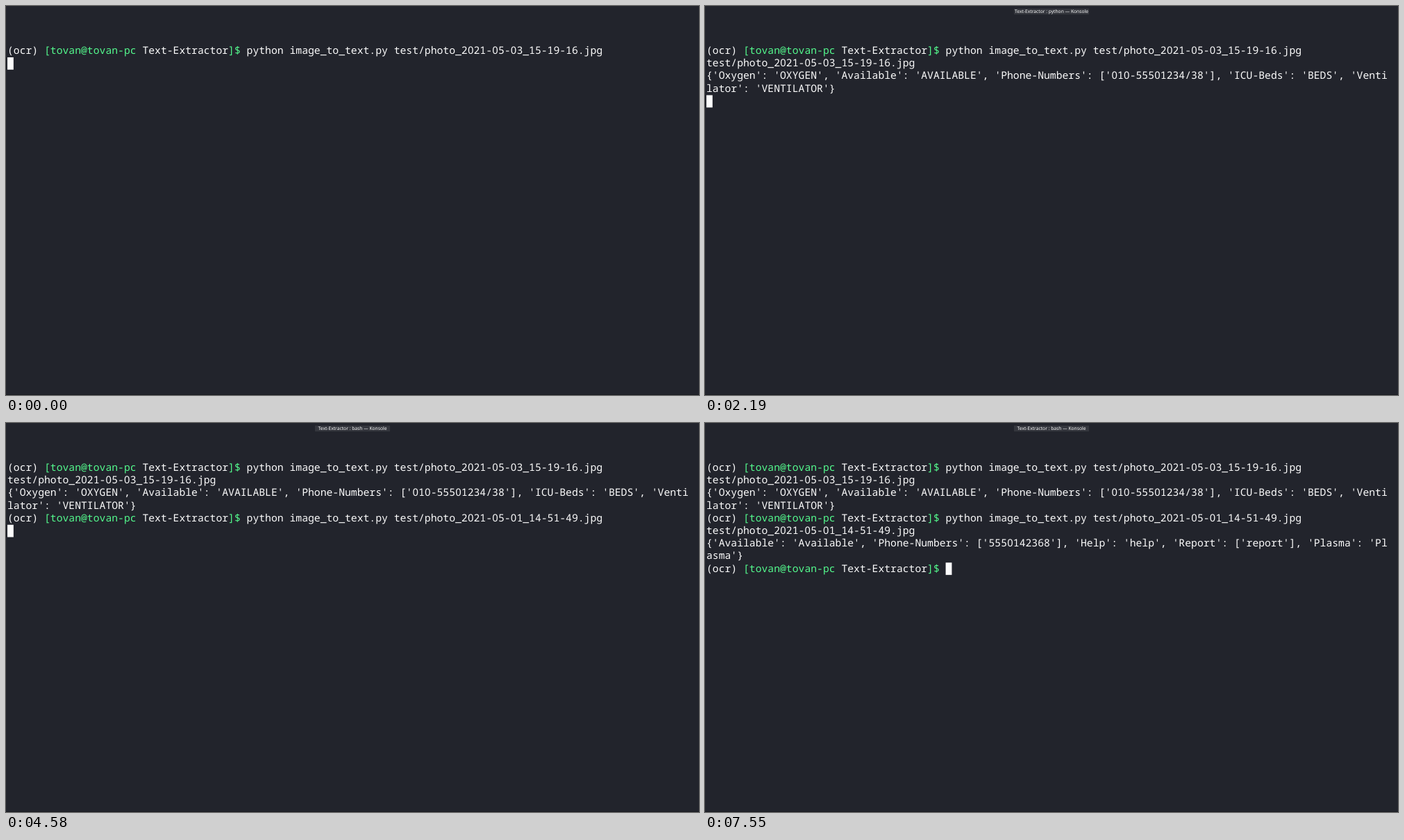
Recreate the animation shown at these times as an HTML page. Size 998 px wide and 561 px high, loop 8 s.

```html
<!DOCTYPE html>
<html lang="en">
<head>
<meta charset="utf-8">
<title>Terminal</title>
<style>
  html, body { margin: 0; width: 100%; height: 100%; overflow: hidden; background: #22242c; }
  svg { display: block; width: 998px; height: 561px; }
  text { white-space: pre; text-rendering: geometricPrecision; fill: #fcfcfc; }
  .row { font: 14.73px "Noto Sans Mono", "DejaVu Sans Mono", monospace; }
  .green { fill: #54f98d; }
  .zero { font-family: "Noto Sans", sans-serif; }
  #title { font: 6.68px "Noto Sans", sans-serif; text-anchor: middle; }
</style>
</head>
<body>
<svg viewBox="0 0 998 561">
  <rect width="998" height="561" fill="#22242c"/>
  <rect y="560" width="998" height="1" fill="#191b21"/>
  <g id="bar">
    <rect x="445" y="3.7" width="108" height="8.5" fill="#35373e"/>
    <text id="title" x="499" y="10"></text>
  </g>
  <g id="rows"></g>
  <rect id="cursor" width="8.84" height="17.8" fill="#fcfcfc"/>
</svg>
<script>
const NS = "http://www.w3.org/2000/svg";
const LOOP = 8000;
const LEFT = 2, TOP = 55.7, CELL = 8.836, LINE = 18.19, BASE = 13.4;
const $ = id => document.getElementById(id);

const USER = "tovan";
const PROMPT = [["(ocr) "], [`[${USER}@${USER}-pc`, "green"], [" Text-Extractor"], ["]$", "green"], [" "]];
const PROMPT_LEN = PROMPT.reduce((n, [s]) => n + s.length, 0);
const fileA = "test/photo_2021-05-03_15-19-16.jpg";
const fileB = "test/photo_2021-05-01_14-51-49.jpg";
const command = file => [...PROMPT, ["python image_to_text.py " + file]];
const END = command(fileA).reduce((n, [s]) => n + s.length, 0);

// Each line: row, start, end, coloured runs
const lines = [
  [0, 0, LOOP, command(fileA)],
  [1, 300, LOOP, [[fileA]]],
  [2, 2190, LOOP, [["{'Oxygen': 'OXYGEN', 'Available': 'AVAILABLE', 'Phone-Numbers': ['010-55501234/38'], 'ICU-Beds': 'BEDS', 'Venti"]]],
  [3, 2190, LOOP, [["lator': 'VENTILATOR'}"]]],
  [4, 2340, 3210, PROMPT],
  [4, 3210, 3580, command(fileA)],
  [4, 3580, LOOP, command(fileB)],
  [5, 4760, LOOP, [[fileB]]],
  [6, 7270, LOOP, [["{'Available': 'Available', 'Phone-Numbers': ['5550142368'], 'Help': 'help', 'Report': ['report'], 'Plasma': 'Pl"]]],
  [7, 7270, LOOP, [["asma'}"]]],
  [8, 7360, LOOP, PROMPT]
];

// Time, row, column
const cursorStops = [
  [0, 1, 0], [300, 2, 0], [2190, 4, 0], [2340, 4, PROMPT_LEN], [3210, 4, END],
  [3580, 4, END + 1], [4580, 5, 0], [4760, 6, 0], [7270, 8, 0], [7360, 8, PROMPT_LEN]
];
const titleStops = [[0, ""], [490, "python"], [3700, "bash"], [4970, "python"], [7550, "bash"]];

function add(parent, tag, attrs) {
  const el = document.createElementNS(NS, tag);
  for (const key in attrs) el.setAttribute(key, attrs[key]);
  return parent.appendChild(el);
}

// Places every character on the terminal grid.
function drawLine(row, runs) {
  const group = add($("rows"), "g", {});
  let col = 0;
  for (const [run, tone = ""] of runs) {
    for (const part of run.match(/0| +|[^ 0]+/g)) {
      if (part[0] !== " ") {
        const zero = part === "0";
        const xs = [...part].map((c, i) => (LEFT + (col + i) * CELL + (zero ? 0.2 : 0)).toFixed(2));
        add(group, "text", {
          class: `row ${tone} ${zero ? "zero" : ""}`,
          x: xs.join(" "),
          y: TOP + row * LINE + BASE
        }).textContent = part;
      }
      col += part.length;
    }
  }
  return group;
}

const drawn = lines.map(([row, start, end, runs]) => ({ start, end, el: drawLine(row, runs) }));
const latest = (stops, t) => stops.filter(s => s[0] <= t).pop();
const show = (el, on) => el.setAttribute("visibility", on ? "visible" : "hidden");

function render(t) {
  for (const { start, end, el } of drawn) show(el, t >= start && t < end);
  const [, row, col] = latest(cursorStops, t);
  $("cursor").setAttribute("x", LEFT + col * CELL);
  $("cursor").setAttribute("y", TOP + row * LINE + 0.1);
  const task = latest(titleStops, t)[1];
  show($("bar"), task);
  $("title").textContent = `Text-Extractor : ${task} — Konsole`;
}

let origin;
function tick(now) {
  origin ??= now;
  render(Math.max(0, now - origin) % LOOP);
  requestAnimationFrame(tick);
}
render(0);
requestAnimationFrame(tick);
</script>
</body>
</html>
```
